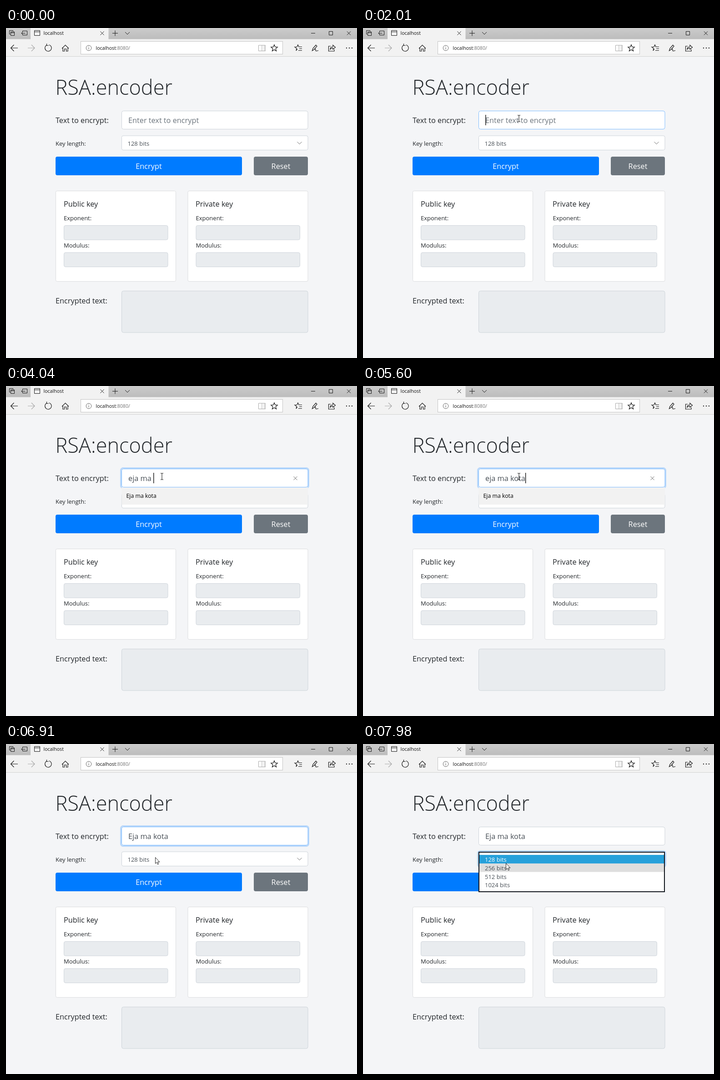
Animation, 772 px wide and 726 px high, one loop 8 s. Source, as an HTML page:

```html
<!DOCTYPE html>
<html lang="en">
<head>
<meta charset="utf-8">
<title>RSA:encoder</title>
<style>
html, body { margin: 0; width: 100%; height: 100%; overflow: hidden; background: #f4f5f7; }
svg { display: block; width: 772px; height: 726px; }
text { font: 13px "Open Sans", "Noto Sans", sans-serif; fill: #212529; white-space: pre; }
.title { font-size: 45.1px; font-weight: 300; }
.large { font-size: 16.3px; }
.chrome { font-size: 10.6px; fill: #111; }
.hint { font-size: 12.3px; fill: #000; }
.muted { fill: #6c757d; }
.value { fill: #495057; }
.white { fill: #fff; }
.mid { text-anchor: middle; }
.icon { fill: none; stroke: #1b1b1b; stroke-width: 1.2; }
.thin { stroke-width: 1; }
.grey { stroke: #6a6a6a; }
.faint { stroke: #a9a9a9; }
.box { fill: #fff; stroke: #ced4da; }
.readonly { fill: #e9ecef; stroke: #ced4da; }
.card { fill: #fff; stroke: #dcdddf; }
.glow { fill: none; stroke: #b8d7fa; stroke-width: 3; }
</style>
</head>
<body>
<svg viewBox="0 0 772 726">
  <defs>
    <linearGradient id="bar" x2="0" y2="1">
      <stop stop-color="#cbcbcb"/><stop offset="1" stop-color="#bcbcbc"/>
    </linearGradient>
    <path id="cross" d="M-4-4 4 4M4-4-4 4"/>
    <path id="star" d="M0-7.2 2-2.4 7.2-2 3.2 1.5 4.5 6.6 0 3.8-4.5 6.6-3.2 1.5-7.2-2-2-2.4Z"/>
    <g id="keyCard">
      <rect class="card" x="109.5" y="358.5" width="264" height="199" rx="3"/>
      <text x="127" y="423">Exponent:</text>
      <rect class="readonly" x="127.5" y="434.5" width="228.5" height="31.5" rx="3.5"/>
      <text x="127" y="483">Modulus:</text>
      <rect class="readonly" x="127.5" y="494" width="228.5" height="31.5" rx="3.5"/>
    </g>
  </defs>

  <!-- Browser window -->
  <rect width="772" height="25" fill="url(#bar)"/>
  <rect y="24.5" width="772" height="38.5" fill="#f2f2f2"/>
  <rect x="54" width="171.5" height="26" fill="#f2f2f2"/>
  <path d="M0 62.5H772" stroke="#d2d2d2"/>
  <rect x="164.5" y="29.5" width="444" height="28" fill="#fff" stroke="#c4c4c4"/>
  <g class="icon thin">
    <path d="M9.5 13.5H7.5V5.5H15.5V7.5M10.5 8.5H18.5V16.5H10.5ZM10.5 10.5H18.5"/>
    <path d="M36.5 9V6.5H46.5V15.5H36.5V13M42.5 11.5H34M36.5 9 34 11.5 36.5 14"/>
    <path d="M62.5 5.5H74.5V16.5H62.5ZM62.5 8.5H74.5"/>
    <path d="M234 11.5H246M240 5.5V17.5M262 9 267 14 272 9M671 11.5H680M710.5 7.5H718.5V15.5H710.5Z"/>
    <use href="#cross" x="211.5" y="11.5"/>
    <use href="#cross" x="754" y="11.5"/>
    <path class="faint" d="M563 38V51M555.5 38H570.5V50.5H555.5ZM568 38V50"/>
    <circle class="grey" cx="182" cy="44" r="5.8"/>
    <path class="grey" d="M182 43V47M182 40.5V41.8"/>
  </g>
  <g class="icon">
    <path d="M26 44H10.5M17.5 37 10.5 44 17.5 51"/>
    <path class="faint" d="M48 44H63M56 37 63 44 56 51"/>
    <path d="M89 38A7.2 7.2 0 1 0 94.5 37M89.5 34.5V38.5H93.5"/>
    <path d="M123 45 130.5 37.5 138 45M125 43.5V51H128.5V46H132.5V51H136V43.5"/>
    <use href="#star" x="590" y="44"/>
    <path d="M641 46 638 50 639.2 45 635 41.8 640 41.5 642 37 644 41.5H651M645 45.5H651M643 49.5H651"/>
    <path d="M673.5 50 675 45 681.5 37.5 684 40 677.5 47.5ZM677.5 47.5Q682 45 681 48.5T687 49.5"/>
    <path d="M714 40H709.5V51H722V47M713 47Q713 41 719 41V37.5L724.5 42.5 719 47V44Q715 43.5 713 47Z"/>
  </g>
  <path d="M748 44H762" stroke="#1b1b1b" stroke-width="2" stroke-dasharray="2 4"/>
  <text class="chrome" x="82.5" y="15">localhost</text>
  <text class="chrome" x="197.5" y="48">localhost<tspan fill="#747474">:8080/</tspan></text>

  <!-- Page -->
  <text class="title" x="108.5" y="147">RSA:encoder</text>
  <text class="large" x="109" y="209">Text to encrypt:</text>
  <text x="109" y="259">Key length:</text>
  <rect x="109" y="283" width="410" height="41" rx="4" fill="#007bff"/>
  <text class="large white mid" x="314" y="310">Encrypt</text>
  <rect x="545" y="283" width="119" height="41" rx="4" fill="#6c757d"/>
  <text class="large white mid" x="604.5" y="310">Reset</text>
  <use href="#keyCard"/>
  <use href="#keyCard" x="290.5"/>
  <text class="large" x="127" y="393">Public key</text>
  <text class="large" x="417" y="393">Private key</text>
  <text class="large" x="109" y="606">Encrypted text:</text>
  <rect class="readonly" x="254.5" y="578.5" width="409.5" height="91.5" rx="4"/>

  <rect class="box" x="254.5" y="237" width="409.5" height="31.5" rx="3.5"/>
  <text class="value" x="267.5" y="259">128 bits</text>
  <path class="icon thin grey" d="M640.5 250.5 645.5 255.5 650.5 250.5"/>

  <rect id="inputGlow" class="glow" x="252.5" y="180.5" width="413" height="44" rx="5"/>
  <g id="hint">
    <rect id="hintRow" x="254.5" y="223" width="409.5" height="38"/>
    <text class="hint" x="264.5" y="246">Eja ma kota</text>
  </g>
  <rect id="input" class="box" x="254.5" y="182.5" width="409.5" height="40" rx="4"/>
  <text id="placeholder" class="large muted" x="269" y="209">Enter text to encrypt</text>
  <text id="typed" class="large value" x="269" y="209"></text>
  <use id="clear" class="icon thin grey" href="#cross" x="636.5" y="203"/>
  <rect id="caret" y="191" width="1.3" height="23"/>

  <g id="options">
    <rect class="glow" x="252.5" y="235.5" width="413" height="35" rx="5"/>
    <rect x="255" y="238" width="408" height="87" fill="#fff" stroke="#10151c" stroke-width="2"/>
  </g>

  <g id="pointer">
    <path id="arrow" d="M.5.5V14L3.6 11.2 5.7 16 7.7 15.1 5.7 10.5H9.8Z" fill="#fff" stroke="#111" stroke-width=".9"/>
    <path id="beam" d="M-3-7H-1Q0-7 0-6V6Q0 7-1 7H-3M3-7H1Q0-7 0-6M0 6Q0 7 1 7H3" fill="none" stroke="#111"/>
  </g>
</svg>
<script>
const LOOP = 8000, STEP = 76;
const FOCUS = 2010, HOVER = 6010, PICK = 6450, OPEN = 7200;
const PHRASE = 'eja ma kota';

const $ = id => document.getElementById(id);
const show = (id, on) => { $(id).style.display = on ? '' : 'none'; };
const between = (v, from, to) => v >= from && v < to;
const clamp = v => Math.min(1, Math.max(0, v));

$('options').innerHTML += [128, 256, 512, 1024].map((bits, i) => {
  const top = 244 + 18.8 * i;
  const fill = ['#26a0da', '#dedede'][i] || '#fff';
  return `<rect x="256" y="${top}" width="406" height="19" fill="${fill}"/>
    <text class="${i ? 'value' : 'white'}" x="268" y="${top + 15}">${bits} bits</text>`;
}).join('');

// Each leg follows a curve from one point, past a second, to a third.
const legs = [
  { start: 300, end: 1080, power: 1.5, path: [[754, 700], [690, 380], [605, 128]] },
  { start: 1160, end: 1940, power: 1, path: [[580, 119], [440, 67], [343, 199]] },
  { start: 5910, end: 6520, power: 5, path: [[343, 199], [329, 236], [329, 244]] },
  { start: 6690, end: 7280, power: .6, path: [[329, 244], [326, 260], [326, 277]] },
  { start: 7600, end: 7980, power: 3, path: [[326, 277], [314, 271], [314, 262]] }
];

function pointerAt(t) {
  const { start, end, power, path: [a, b, c] } = legs.findLast(leg => t >= leg.start) || legs[0];
  const steps = Math.round((end - start) / STEP);
  const progress = clamp(Math.floor((t - start) / (end - start) * steps) / steps);
  const u = 1 - (1 - progress) ** power, v = 1 - u;
  return [0, 1].map(k => Math.round(v * v * a[k] + 2 * u * v * b[k] + u * u * c[k]));
}

// Typing slows a little with every key.
const keyTime = i => 3250 + 110 * i + 2.5 * i * i;

// The caret fades out and back in, counted from the last key or focus.
function caretLevel(t, count) {
  if (!between(t, FOCUS, PICK)) return 0;
  const phase = (t - (count ? keyTime(count - 1) : FOCUS)) % 1060;
  return clamp(phase < 700 ? (540 - phase) / 160 : (phase - 880) / 80);
}

function render(t) {
  const count = [...PHRASE].filter((_, i) => t >= keyTime(i)).length;
  const text = PHRASE.slice(0, count);
  $('typed').textContent = t >= PICK ? 'E' + text.slice(1) : text;
  show('placeholder', !count);
  show('clear', count && t < PICK);

  const focused = between(t, FOCUS, OPEN);
  $('input').style.stroke = focused ? '#80bdff' : '';
  $('inputGlow').style.opacity = focused ? clamp((t - FOCUS) / 150) : 0;
  show('hint', between(t, FOCUS + STEP, PICK));
  $('hintRow').setAttribute('fill', t >= HOVER ? '#d9d9d9' : '#f2f2f2');
  show('options', t >= OPEN);

  const width = count ? $('typed').getComputedTextLength() : 0;
  $('caret').setAttribute('x', 269.2 + width);
  $('caret').style.opacity = caretLevel(t, count);

  const [x, y] = pointerAt(t);
  const overInput = between(x, 255, 664) && between(y, 182, 223);
  show('pointer', t >= legs[0].start);
  show('arrow', !overInput);
  show('beam', overInput);
  $('pointer').setAttribute('transform', `translate(${x} ${y})`);
}

const began = performance.now();
function tick() {
  render((performance.now() - began) % LOOP);
  requestAnimationFrame(tick);
}
tick();
</script>
</body>
</html>
```
